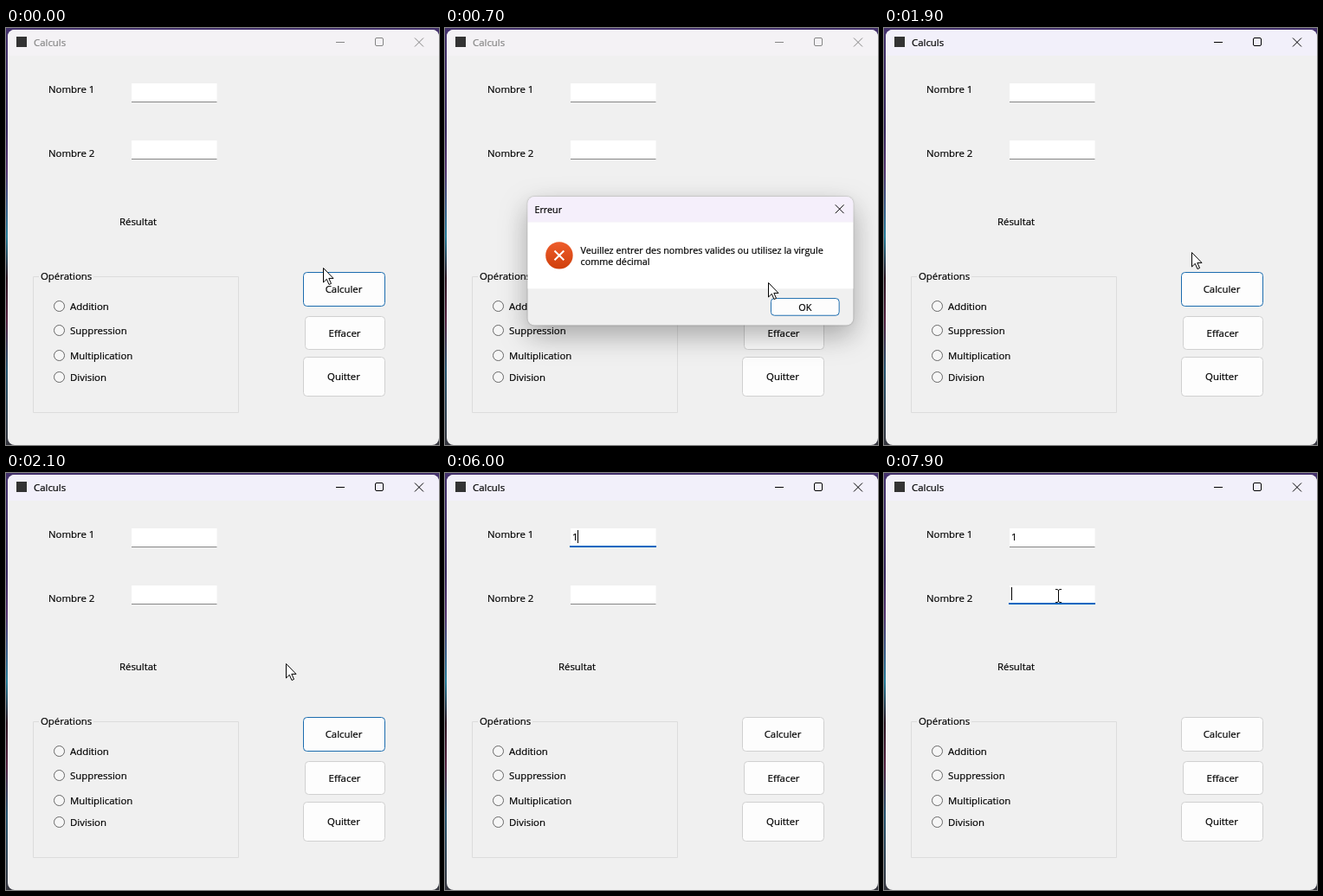
An HTML page for the animation above (8000 ms loop, 500 by 482 pixels).

```html
<!DOCTYPE html>
<html lang="fr">
<head>
<meta charset="utf-8">
<title>Calculs</title>
<style>
html, body { margin: 0; width: 100%; height: 100%; overflow: hidden; }
svg { display: block; width: 500px; height: 482px; font: 11.4px "Open Sans", "Noto Sans", sans-serif; }
text { fill: currentColor; stroke: currentColor; stroke-width: .2px; }
.mid { text-anchor: middle; }
.line { fill: none; stroke: currentColor; }
.button { fill: #fdfdfd; stroke: #d0d0d0; }
.default { stroke: #1b6cae; }
.hover { fill: #e8f3fb; stroke: #0078d4; }
#dialog { font-size: 11px; transform-origin: 250px 255px; }
#shadow { filter: drop-shadow(0 12px 16px rgba(0, 0, 0, .25)) drop-shadow(0 0 1px rgba(0, 0, 0, .3)); }
</style>
</head>
<body>
<svg viewBox="0 0 500 482">
  <defs>
    <linearGradient id="desk" x2="0" y2="1">
      <stop stop-color="#43306b"/>
      <stop offset=".24" stop-color="#33245a"/>
      <stop offset=".34" stop-color="#54336f"/>
      <stop offset=".5" stop-color="#257f9c"/>
      <stop offset=".6" stop-color="#2a1420"/>
      <stop offset=".7" stop-color="#54203f"/>
      <stop offset=".82" stop-color="#245470"/>
      <stop offset="1" stop-color="#35353d"/>
    </linearGradient>
    <linearGradient id="alert" x2="0" y2="1">
      <stop stop-color="#ee5d2c"/>
      <stop offset="1" stop-color="#cf3f0b"/>
    </linearGradient>
  </defs>

  <rect width="500" height="482" fill="url(#desk)"/>
  <rect x="2" y="2" width="498" height="480" rx="8" fill="#f0f0f0"/>
  <path id="bar" d="M2 32V10a8 8 0 0 1 8-8H492a8 8 0 0 1 8 8V32Z"/>
  <rect x="12" y="10" width="12" height="12" fill="#333"/>
  <g id="caption">
    <text x="32" y="21">Calculs</text>
    <path class="line" d="M381 16.5h10M472 11.5l10 10m0-10l-10 10"/>
    <rect class="line" x="426.5" y="11.5" width="9" height="9" rx="1.5"/>
  </g>

  <text x="49" y="75">Nombre 1</text>
  <text x="49" y="149">Nombre 2</text>
  <text x="131" y="228">Résultat</text>
  <g id="fields"></g>
  <text id="typed" x="147" y="78">1</text>
  <rect id="caret" width="1" height="15"/>

  <path d="M38 287.5H31.5V444.5H268.5V287.5H101" fill="none" stroke="#dcdcdc"/>
  <text x="40" y="291">Opérations</text>
  <g id="radios"></g>
  <g id="buttons"></g>

  <g id="dialog">
    <rect id="shadow" x="93" y="194" width="382" height="151" rx="8" fill="#f0f0f0"/>
    <path d="M93 224V202a8 8 0 0 1 8-8H467a8 8 0 0 1 8 8V224Z" fill="#f5effb"/>
    <rect x="93" y="224" width="382" height="78" fill="#fff"/>
    <text x="101" y="213">Erreur</text>
    <path class="line" d="M454 203.5l10 10m0-10l-10 10"/>
    <circle cx="130" cy="263" r="16" fill="url(#alert)"/>
    <path d="M124.5 257.5l11 11m0-11l-11 11" stroke="#fff" stroke-width="2"/>
    <text x="155" y="261">Veuillez entrer des nombres valides ou utilisez la virgule</text>
    <text x="155" y="274">comme décimal</text>
    <rect id="ok" class="button default" x="378.5" y="313.5" width="80" height="20" rx="4"/>
    <text class="mid" x="418.5" y="328">OK</text>
  </g>

  <g id="pointer">
    <path id="arrow" d="M.5.5V17l3.8-3.7 2.7 6.2 2.5-1.1-2.7-6H12Z" fill="#fff" stroke="#000"/>
    <path id="beam" class="line" d="M-3-7.5H-1L.5-6.5 2-7.5H4M.5-6.5V6.5M-3 7.5H-1L.5 6.5 2 7.5H4"/>
  </g>
</svg>
<script>
const $ = id => document.getElementById(id);
const show = (id, on) => $(id).style.display = on ? "" : "none";
const within = (t, spans) => spans.some(([a, b]) => t >= a && t < b);

$("fields").innerHTML = [64, 130].map(y =>
  `<rect x="145" y="${y}" width="98.5" height="22" fill="#fff"/>
   <rect id="field${y}"/>`).join("");

$("radios").innerHTML = [["Addition", 321.5], ["Suppression", 349.5], ["Multiplication", 378.5], ["Division", 403.5]]
  .map(([label, y]) =>
    `<circle cx="61.5" cy="${y}" r="6" fill="#f6f6f6" stroke="#666"/>
     <text x="74" y="${y + 4.5}">${label}</text>`).join("");

$("buttons").innerHTML = [["Calculer", 343.5, 282.5, 39], ["Effacer", 345.5, 333.5, 38], ["Quitter", 343.5, 380.5, 45]]
  .map(([label, x, y, h]) =>
    `<rect id="${label}" class="button" x="${x}" y="${y}" width="${437.5 - x}" height="${h}" rx="4"/>
     <text class="mid" x="${(x + 437.5) / 2 - .5}" y="${Math.round(y + h / 2 + 4)}">${label}</text>`).join("");

// Tracks: [time, value, ...] rows with linear motion between them
const pointerTrack = [
  [0, 366, 277], [300, 373, 294], [700, 373, 294], [1400, 402, 317], [1600, 402, 317],
  [2100, 323, 220], [2800, 195, 77], [6500, 195, 77], [6800, 191, 154], [7000, 191, 154], [7400, 201, 142]
];
// Dialog scale and opacity
const dialogTrack = [
  [0, .92, 0], [400, .92, 0], [600, .965, .8], [700, .984, 1], [800, 1, 1], [1500, 1, 1], [1800, .93, 0]
];
const caretTimes = [[3000, 3200], [4000, 4400], [5000, 5400], [6000, 6200], [7100, 8000]];

function sample(track, t) {
  const i = track.findIndex(row => row[0] > t);
  if (i < 0) return track.at(-1).slice(1);
  const [a, b] = [track[i - 1], track[i]];
  const k = (t - a[0]) / (b[0] - a[0]);
  return a.slice(1).map((v, j) => v + (b[j + 1] - v) * k);
}

function setUnderline(y, focused) {
  const attrs = focused
    ? { x: 144, y: y + 20, width: 100, height: 2, fill: "#0067c0" }
    : { x: 145, y: y + 21, width: 98.5, height: 1, fill: "#868686" };
  for (const name in attrs) $("field" + y).setAttribute(name, attrs[name]);
}

function draw(t) {
  const active = t >= 1600;
  $("bar").setAttribute("fill", active ? "#f2f0fa" : "#f4f2f5");
  $("caption").style.color = active ? "#000" : "#858585";

  const [scale, opacity] = sample(dialogTrack, t);
  show("dialog", opacity > 0);
  $("dialog").style.opacity = opacity;
  $("dialog").style.transform = `scale(${scale})`;
  $("ok").classList.toggle("hover", t >= 1500);

  const second = t >= 7600;
  setUnderline(64, t >= 3000 && !second);
  setUnderline(130, second);
  $("Calculer").classList.toggle("default", t < 3000);

  const typed = t >= 6000;
  show("typed", typed);
  show("caret", within(t, caretTimes));
  $("caret").setAttribute("x", typed && !second ? 153 : 147);
  $("caret").setAttribute("y", second ? 132 : 66);

  const [x, y] = sample(pointerTrack, t).map(Math.round);
  const overField = x > 144 && x < 243 && within(y, [[64, 86], [130, 152]]);
  show("pointer", !within(t, [[6000, 6600]]));
  show("arrow", !overField);
  show("beam", overField);
  $("pointer").setAttribute("transform", `translate(${x} ${y})`);
}

// The picture advances in steps of 100 ms
function tick() {
  draw(Math.floor(performance.now() % 8000 / 100) * 100);
  requestAnimationFrame(tick);
}
tick();
</script>
</body>
</html>
```
